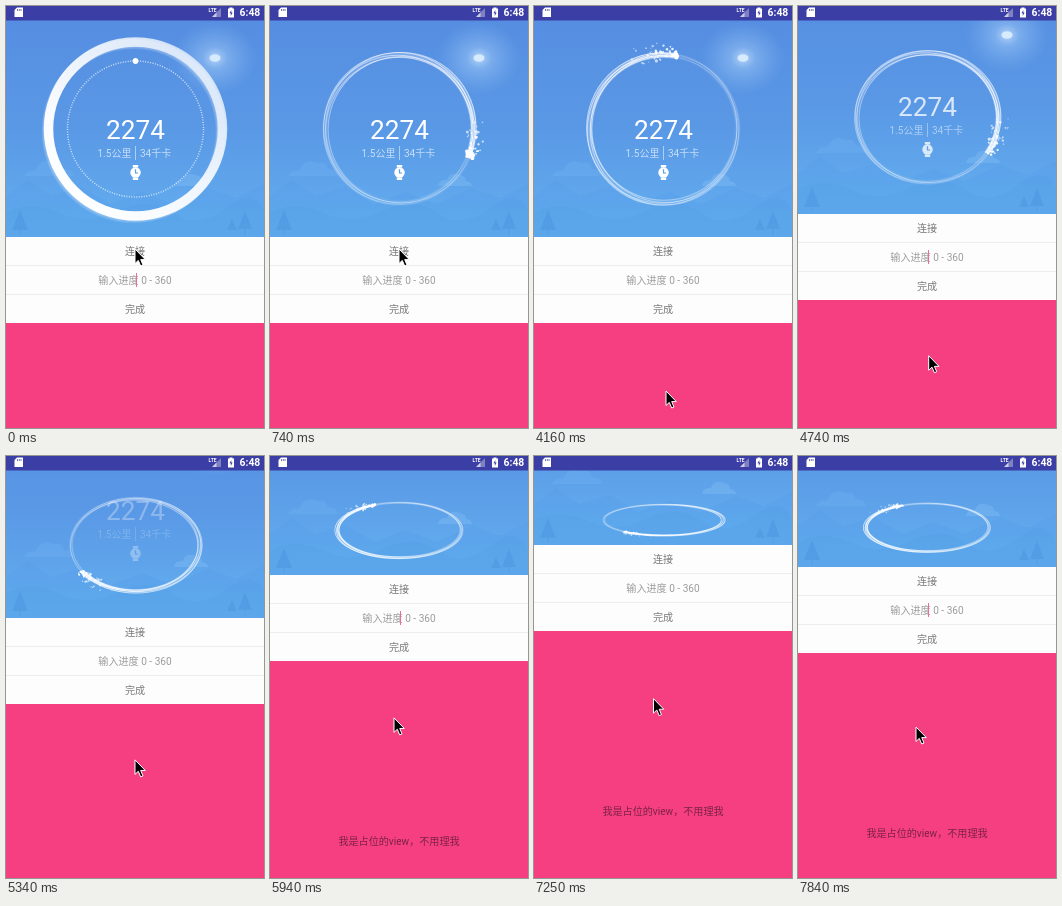
An HTML page with a canvas that plays this animation: 258 by 422 pixels, repeating every 7.99 s.

```html
<!DOCTYPE html>
<html lang="zh-CN">
<head>
<meta charset="utf-8">
<style>
html, body { margin: 0; width: 100%; height: 100%; overflow: hidden; background: #f63f80; }
body { font: 10.1px Roboto, "Noto Sans CJK SC", "Noto Sans CJK", sans-serif; }
#stage { position: relative; width: 258px; height: 422px; overflow: hidden; background: #f63f80; }
#stage > * { position: absolute; left: 0; top: 0; }
#scene, #label { width: 258px; height: 231px; }
#label text { fill: #fff; }
#list { width: 258px; }
.row { position: relative; box-sizing: border-box; height: 29px; line-height: 30px; text-align: center;
  background: #fdfdfd; color: #777; border-bottom: 1px solid #ededed; }
.row:nth-child(3) { height: 28px; border: 0; }
.hint { color: #9c9c9c; }
#caret { position: absolute; left: 129.5px; top: 7px; width: 1px; height: 14px; background: #ee6a9c; }
#note { position: absolute; top: 258px; width: 258px; line-height: 18px; text-align: center; color: rgba(30, 10, 25, .56); }
#ring { width: 258px; height: 422px; }
</style>
</head>
<body>
<div id="stage">
  <svg id="scene" viewBox="0 0 258 231">
    <defs>
      <linearGradient id="sky" x2="0" y2="1">
        <stop stop-color="#558ce0"/><stop offset=".55" stop-color="#5a99e6"/><stop offset="1" stop-color="#64b0f0"/>
      </linearGradient>
      <radialGradient id="glow">
        <stop stop-color="#d8ebff" stop-opacity=".75"/><stop offset=".3" stop-color="#abd2fa" stop-opacity=".42"/>
        <stop offset="1" stop-color="#8fc0f5" stop-opacity="0"/>
      </radialGradient>
    </defs>
    <rect width="258" height="231" fill="url(#sky)"/>
    <ellipse cx="209" cy="52" rx="42" ry="37" fill="url(#glow)"/>
    <ellipse cx="209" cy="52" rx="5.5" ry="3.8" fill="#dceeff" opacity=".9"/>
    <path d="M168 180q1-7 9-6q3-9 13-5q6 1 6 6q6 1 6 5z" fill="#8cc3f6" opacity=".3"/>
    <path d="M18 170q4-7 11-5q6-14 18-8q9-2 11 6q9 0 10 7z" fill="#8cc3f6" opacity=".14"/>
    <g fill="#3f8bdb">
      <path opacity=".13" d="M0 190L22 174L45 190L76 181L104 198L136 186L166 198L202 182L230 192L258 178V231H0z"/>
      <path opacity=".11" d="M0 206Q28 194 54 207T112 205T168 207T220 202T258 206V231H0z"/>
    </g>
    <g fill="#4a95df" opacity=".5">
      <path d="M14 204l8 20H6zM239 205l7 18h-14zM226 213l5 11h-10z"/>
      <path d="M13.5 222h1v7h-1zM238.5 222h1v7h-1z"/>
    </g>
  </svg>
  <svg id="label" viewBox="0 0 258 231">
    <text x="129.5" y="133.2" text-anchor="middle" font-size="26.2">2274</text>
    <g font-size="10" opacity=".66">
      <text x="91.5" y="151">1.5公里</text><text x="134" y="151">34千卡</text>
    </g>
    <path d="M129.5 140v14" stroke="#fff" stroke-opacity=".5"/>
    <path d="M126.800 159h5.400v2.500h-5.400zM126.800 174h5.400v-2.500h-5.400z" fill="#fff"/>
    <circle cx="129.5" cy="166.500" r="5.2" fill="#fff"/>
    <path d="M129.500 163.200v3.800h2.600" fill="none" stroke="#5a9ee7" stroke-width="1.200"/>
  </svg>
  <canvas id="ring"></canvas>
  <div id="list">
    <div class="row">连接</div>
    <div class="row hint">输入进度 0 - 360<i id="caret"></i></div>
    <div class="row">完成</div>
    <div id="note">我是占位的view，不用理我</div>
  </div>
  <svg width="258" height="15" viewBox="0 0 258 15">
    <path d="M0 0h258v14.400H0z" fill="#3b3ea4"/>
    <path d="M11 1.500h6v9.500H8.500V4z" fill="#fff"/>
    <path d="M11.500 3v2M13.300 3v2M15 3v2" stroke="#3b3ea4" stroke-width=".7"/>
    <path d="M215 2v9h-9z" fill="#fff" opacity=".35"/>
    <path d="M210.500 6.500v4.500h-4.500z" fill="#fff" opacity=".6"/>
    <text x="202.500" y="5.500" font-size="5" font-weight="700" fill="#fff">LTE</text>
    <path d="M222 2.500h1.500v-1h3v1h1.500v9h-6z" fill="#fff"/>
    <path d="M225.300 4l-1.800 3.300h1.300v2.700l1.800-3.500h-1.300z" fill="#3b3ea4"/>
    <text x="233.500" y="10.200" font-size="10.400" font-weight="700" fill="#fff">6:48</text>
  </svg>
  <svg id="mouse" width="14" height="20" viewBox="0 1 14 20" overflow="visible">
    <path d="M0 0V14.500L3.300 11.400L5.700 17L8 16L5.700 10.600H10.300z" fill="#000" stroke="#fff"/>
  </svg>
</div>
<script>
const LOOP = 7990, STEP = LOOP / 54, TAU = Math.PI * 2, CX = 129.5, FULL = 231;
const $ = id => document.getElementById(id);
const ctx = $('ring').getContext('2d');
const dpr = Math.max(2, window.devicePixelRatio || 1);
$('ring').width = 258 * dpr;
$('ring').height = 422 * dpr;

// Rows are [key, value, value, ...] with ascending keys.
function track(rows, key) {
  let i = 1;
  while (i < rows.length - 1 && rows[i][0] < key) i++;
  const a = rows[i - 1], b = rows[i];
  const k = Math.min(1, Math.max(0, (key - a[0]) / (b[0] - a[0])));
  return a.slice(1).map((v, j) => v + (b[j + 1] - v) * k);
}

const headerBottom = [[4440, 231], [5325, 162], [5780, 126], [6480, 89], [7350, 89], [7840, 111]];
const mousePath = [[3100, 129, 244], [3560, 132, 357], [3850, 132, 386], [4280, 132, 386],
  [5325, 129, 305], [5780, 125, 270], [6480, 120, 234], [7050, 120, 234], [7840, 118, 272]];
const headAngle = [[0, -112], [740, 23], [2670, 375], [4150, 642], [5330, 867], [6510, 1068], [7840, 1327]];
// header bottom: centre y, x radius, y radius
const tilt = [[89, 64, 62, 16], [111, 71.5, 64, 25], [162, 89, 67, 48], [231, 123, 77, 77]];

let seed = 17;
const random = () => (seed = seed * 16807 % 2147483647) / 2147483647;
const sparks = Array.from({ length: 44 }, () => ({
  phase: random(), lag: random(), side: random() - .4, size: random()
}));

const white = a => `rgba(255,255,255,${a})`;
let sx = 1, sy = 1;

// Conic fade starting at an angle on the tilted circle.
function sweep(angle, stops) {
  const g = ctx.createConicGradient(Math.atan2(sy * Math.sin(angle), sx * Math.cos(angle)), 0, 0);
  stops.forEach((a, i) => g.addColorStop(i / (stops.length - 1), white(a)));
  return g;
}

function circle(x, y, r, width, style) {
  ctx.beginPath();
  ctx.ellipse(x * sx, y * sy, r * sx, r * sy, 0, 0, TAU);
  ctx.lineWidth = width;
  ctx.strokeStyle = style;
  ctx.stroke();
}

function dot(x, y, r) {
  ctx.beginPath();
  ctx.arc(x * sx, y * sy, r * (sx + sy) / 2, 0, TAU);
  ctx.fill();
}

function drawProgress(alpha) {
  ctx.globalAlpha = alpha;
  for (let i = 1; i < 4; i++) circle(-i * .7, i * .8, 87, 9.5, white(.11));
  circle(0, 0, 87, 9.5, sweep(-Math.PI / 4, [.68, .78, .95, 1, .95, .78, .68]));
  ctx.setLineDash([1, 1.5]);
  circle(0, 0, 68, 1.5, white(.7));
  ctx.setLineDash([]);
  ctx.fillStyle = '#fff';
  dot(0, -68, 3);
}

function drawSwirl(t, head, alpha) {
  ctx.globalAlpha = alpha;
  circle(0, 0, 74, 1 + 5 * sy, sweep(head, [.04, .08, .14, .24, .4]));
  const line = sweep(head, [.14, .26, .42, .58, .8]);
  for (let i = 0; i < 5; i++) {
    const a = head + i * TAU / 5;
    circle(2 * Math.cos(a), 2 * Math.sin(a), 73.2 + i * .5, .9, line);
  }
  ctx.fillStyle = '#fff';
  for (const s of sparks) {
    const age = (t / 700 + s.phase) % 1;
    const a = head - age * (.25 + .4 * s.lag);
    const r = 75 + s.side * (4 + 16 * Math.sqrt(age));
    ctx.globalAlpha = alpha * (1 - age * .5);
    dot(r * Math.cos(a), r * Math.sin(a), (.9 + 1.3 * s.size) * (1 - age * .4));
  }
}

function render(t) {
  const bottom = Math.round(track(headerBottom, t)[0]);
  const [cy, rx, ry] = track(tilt, bottom);
  const [mx, my] = track(mousePath, t);
  const shift = `translateY(${bottom - FULL}px)`;

  $('scene').style.transform = $('label').style.transform = shift;
  $('label').style.opacity = Math.max(0, 1 - (FULL - bottom) / 100);
  $('list').style.transform = `translateY(${bottom}px)`;
  $('mouse').style.transform = `translate(${mx}px,${my}px)`;
  const beat = t % 1000;
  $('caret').style.opacity = (t < 2000 ? beat < 500 : beat >= 480) ? 1 : 0;

  ctx.setTransform(1, 0, 0, 1, 0, 0);
  ctx.clearRect(0, 0, 258 * dpr, 422 * dpr);
  ctx.setTransform(dpr, 0, 0, dpr, dpr * CX, dpr * cy);
  sx = rx / 77;
  sy = ry / 77;
  const swap = Math.min(1, Math.max(0, (t - 50) / 350));
  if (swap < 1) drawProgress(1 - swap);
  if (swap > 0) drawSwirl(t, track(headAngle, t)[0] * TAU / 360, swap);
}

const start = performance.now();
function tick() {
  const t = (performance.now() - start) % LOOP;
  render(Math.min(53, Math.floor(t / STEP + .12)) * STEP);
  requestAnimationFrame(tick);
}
tick();
</script>
</body>
</html>
```
